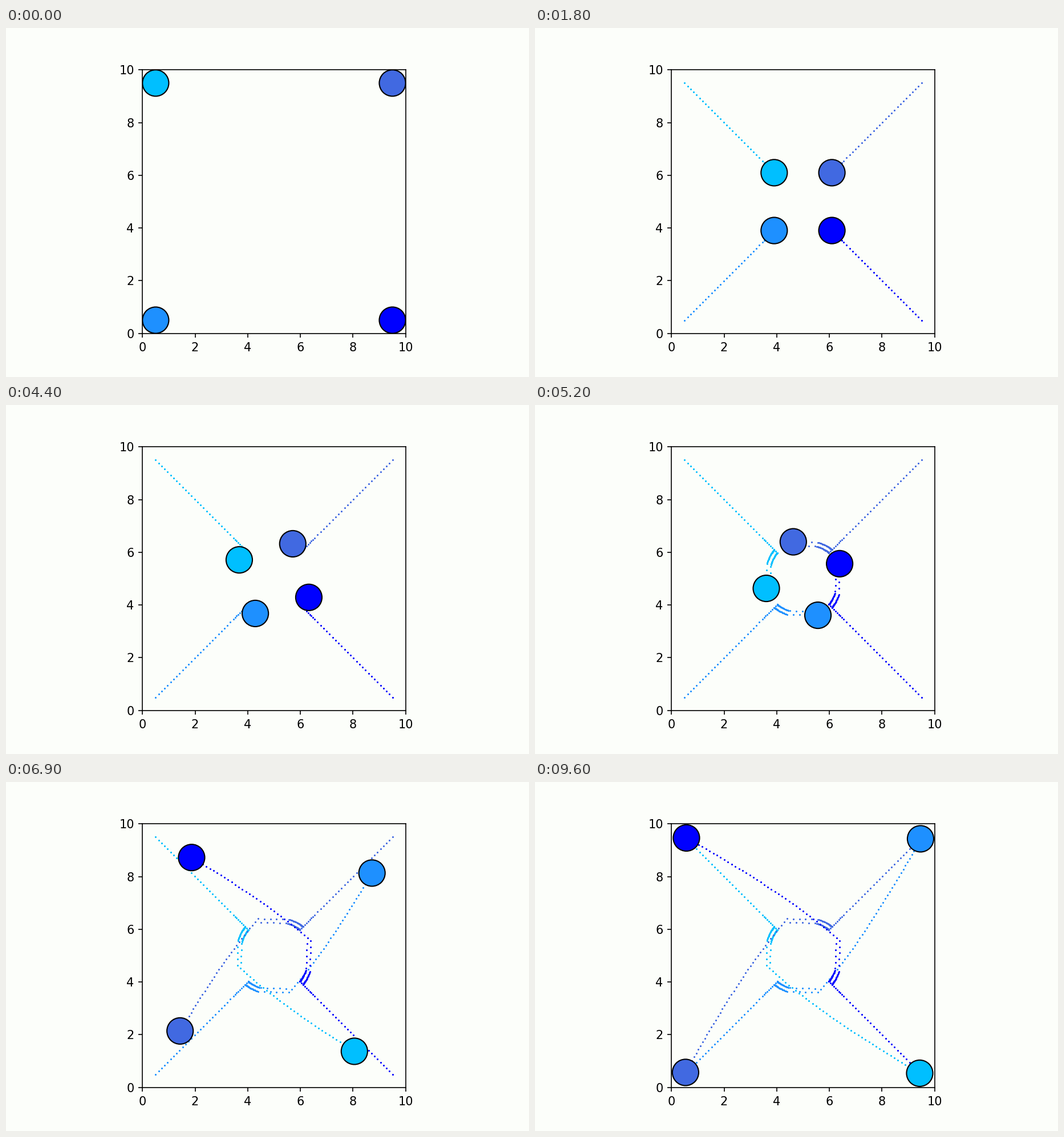
Write a matplotlib script that moves like this. It is 917 by 611 pixels and loops after 10 s.

```python
import numpy as np
import matplotlib.pyplot as plt
from matplotlib.animation import FuncAnimation
from matplotlib.patches import Circle

W, H, DPI = 917, 611, 150
FRAMES, INTERVAL = 200, 50
BACK = "#fcfefa"

START = 4.5 - 4.5j          # corner, relative to the centre
GOAL = -START
CRUISE_END, MEET = 26, 35   # full speed, then slowing until the balls meet
STEP = 0.1608
RING = 1.552
BOUNCE = 0.162              # inward hop made on every odd step
SLIDE_SPEED = 0.117
EXIT_SPEED = 0.1625
SWERVE, SWERVE_FADE = np.radians(8), 2.6
STOP_GAP = 0.075

# colour, quarter turns, first sliding step, step of leaving the ring
BALLS = [
    ("deepskyblue", 2, 96, 104),
    ("royalblue", 1, 96, 106),
    ("dodgerblue", 3, 94, 104),
    ("blue", 0, 94, 104),
]


def approach(n):
    radius = abs(START) - STEP * min(n, CRUISE_END)
    if n > CRUISE_END:
        t = (n - CRUISE_END) / (MEET - CRUISE_END)
        radius += (RING - BOUNCE - radius) * t
    return radius * START / abs(START)


def orbit(n, hop=True):
    """Slow drift around the ring while hopping in and out."""
    turn = 16.7 * (max(n - 36, 0) / 52) ** 2.12
    radius = RING - 0.003 * turn
    if hop and n % 2:
        radius -= BOUNCE
    return radius * np.exp(1j * np.radians(turn - 45))


def slide(n, first):
    """Quick sideways run past the neighbours."""
    k = n - first
    pos = orbit(first, hop=False) + 0.003 * k + 1j * SLIDE_SPEED * k
    return pos - 0.14 * (n % 2)


def leave(pos, travelled):
    """One step to the goal, swerving less the further the ball has gone."""
    way = GOAL - pos
    step = min(EXIT_SPEED, abs(way) - STOP_GAP)
    swerve = SWERVE * np.exp(-travelled / SWERVE_FADE)
    return pos + step * way / abs(way) * np.exp(-1j * swerve)


def make_path(turns, first, exit_step):
    z = []
    for n in range(FRAMES):
        if n <= MEET:
            pos = approach(n)
        elif n <= first:
            pos = orbit(n)
        elif n <= exit_step:
            pos = slide(n, first)
        else:
            pos = leave(pos, EXIT_SPEED * (n - exit_step - 1))
        z.append(pos)
    z = np.array(z) * 1j ** turns + 5 + 5j
    return np.column_stack([z.real, z.imag])


fig = plt.figure(figsize=((W + 0.01) / DPI, (H + 0.01) / DPI), dpi=DPI,
                 facecolor=BACK)
ax = fig.add_axes([239.3 / W, 76.4 / H, 461.3 / W, 461.3 / H], facecolor=BACK)
ax.set_xlim(0, 10)
ax.set_ylim(0, 10)
ax.set_xticks(range(0, 11, 2))
ax.set_yticks(range(0, 11, 2))
ax.tick_params(axis="x", pad=4)

paths, trails, discs = [], [], []
for color, turns, first, exit_step in BALLS:
    path = make_path(turns, first, exit_step)
    trail, = ax.plot([], [], "o", color=color, ms=1.5, mew=0, zorder=2)
    disc = Circle(path[0], 0.5, facecolor=color, edgecolor="black",
                  linewidth=1, zorder=2.4)
    ax.add_patch(disc)
    paths.append(path)
    trails.append(trail)
    discs.append(disc)


def update(n):
    for path, trail, disc in zip(paths, trails, discs):
        trail.set_data(path[:n + 1, 0], path[:n + 1, 1])
        disc.center = path[n]
    return trails + discs


anim = FuncAnimation(fig, update, frames=FRAMES, interval=INTERVAL,
                     init_func=lambda: update(0), repeat=True, repeat_delay=0)
plt.show()
```
